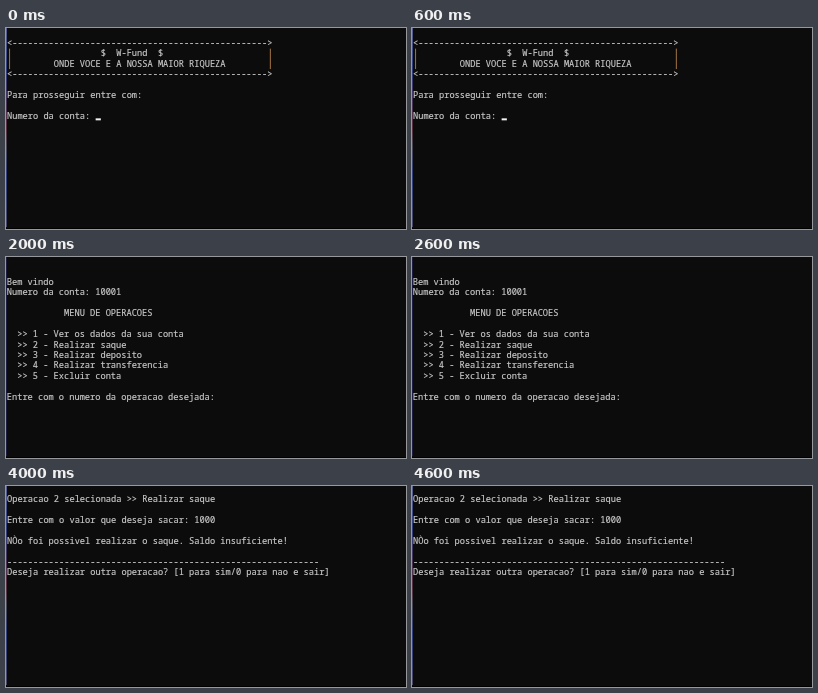
These frames come from a looping animation (400x201 px, 5 s). An HTML page:

```html
<!DOCTYPE html>
<html lang="pt">
<head>
<meta charset="utf-8">
<title>Terminal</title>
<style>
  html, body { margin: 0; width: 100%; height: 100%; overflow: hidden; background: #0c0c0c; }
  svg { display: block; width: 100%; height: 100%; }
  text {
    font: 8.69px "Noto Sans Mono", "DejaVu Sans Mono", monospace;
    font-variant-ligatures: none;
    white-space: pre;
    fill: #ccc;
    stroke: #ccc;
    stroke-width: 0.15px;
  }
</style>
</head>
<body>
<svg viewBox="0 0 400 201" preserveAspectRatio="none">
  <defs>
    <linearGradient id="glow" x2="0" y2="1">
      <stop offset="0" stop-color="#5a6190"/>
      <stop offset=".2" stop-color="#2f3f80"/>
      <stop offset=".5" stop-color="#5c3040"/>
      <stop offset=".6" stop-color="#4a4a58"/>
      <stop offset=".75" stop-color="#2f3f80"/>
      <stop offset="1" stop-color="#4a4a68"/>
    </linearGradient>
  </defs>
  <rect width="400" height="201" fill="#0c0c0c"/>
  <rect y="200" width="400" height="1" fill="#000"/>
  <g id="screen"></g>
</svg>
<script>
const NS = "http://www.w3.org/2000/svg";
const CELL = 5.214, LINE = 10.42, STEP = 1000;
const screen = document.getElementById("screen");

const rule = "<" + "-".repeat(49) + ">";
const header = [
  rule,
  " ".repeat(18) + "$  W-Fund  $",
  " ".repeat(9) + "ONDE VOCE E A NOSSA MAIOR RIQUEZA",
  rule, "",
  "Para prosseguir entre com:", ""
];
const footer = [
  "-".repeat(60),
  "Deseja realizar outra operacao? [1 para sim/0 para nao e sair]"
];

// x, y: left edge and first baseline; cursor: [column, row]; edge: left strip colour
const pages = [
  { x: 1, y: 18, edge: "url(#glow)", bars: "#b5804c", cursor: [17, 7],
    lines: [...header, "Numero da conta: "] },
  { x: -0.7, y: 18.9, bars: "#a89c90",
    lines: [...header, "Numero da conta: 10001", "Senha: 10002"] },
  { x: 0.8, y: 28, edge: "#1c1f42",
    lines: [
      "Bem vindo", "Numero da conta: 10001", "",
      " ".repeat(11) + "MENU DE OPERACOES", "",
      "  >> 1 - Ver os dados da sua conta",
      "  >> 2 - Realizar saque",
      "  >> 3 - Realizar deposito",
      "  >> 4 - Realizar transferencia",
      "  >> 5 - Excluir conta", "",
      "Entre com o numero da operacao desejada:"
    ] },
  { x: 1, y: 19, edge: "url(#glow)", cursor: [64, 7],
    lines: [
      "Operacao 1 selecionada >> Ver os dados da sua conta", "",
      "Numero da conta: 10001",
      "Nome do usuario: ORLANDIR TAVEDO DA BROLA",
      "Saldo atual: 713.50", "", ...footer
    ] },
  { x: 1, y: 16, edge: "url(#glow)",
    lines: [
      "Operacao 2 selecionada >> Realizar saque", "",
      "Entre com o valor que deseja sacar: 1000", "",
      "NÒo foi possivel realizar o saque. Saldo insuficiente!", "", ...footer
    ] }
];

function add(parent, tag, attrs, content = "") {
  const node = document.createElementNS(NS, tag);
  for (const key in attrs) node.setAttribute(key, attrs[key]);
  node.textContent = content;
  return parent.appendChild(node);
}

function build({ x, y, edge, bars, cursor, lines }) {
  const group = add(screen, "g", { visibility: "hidden" });
  if (edge) add(group, "rect", { width: 1, height: 199, fill: edge });
  lines.forEach((line, row) => {
    if (line) add(group, "text", { x, y: y + row * LINE }, line);
  });
  if (bars) {
    for (const col of [0, 50]) {
      add(group, "rect", {
        x: x + (col + 0.5) * CELL - 0.45, y: y + LINE - 7.8,
        width: 0.9, height: 2 * LINE - 0.4, fill: bars
      });
    }
  }
  if (cursor) {
    const [col, row] = cursor;
    add(group, "rect", {
      x: x + col * CELL, y: y + row * LINE - 0.6, width: CELL, height: 2, fill: "#f2f2f2"
    });
  }
  return group;
}

const groups = pages.map(build);

function draw(time) {
  const current = Math.floor(time / STEP) % groups.length;
  groups.forEach((group, i) =>
    group.setAttribute("visibility", i === current ? "visible" : "hidden"));
}

const start = performance.now();
function tick() {
  draw(performance.now() - start);
  requestAnimationFrame(tick);
}
tick();
</script>
</body>
</html>
```
